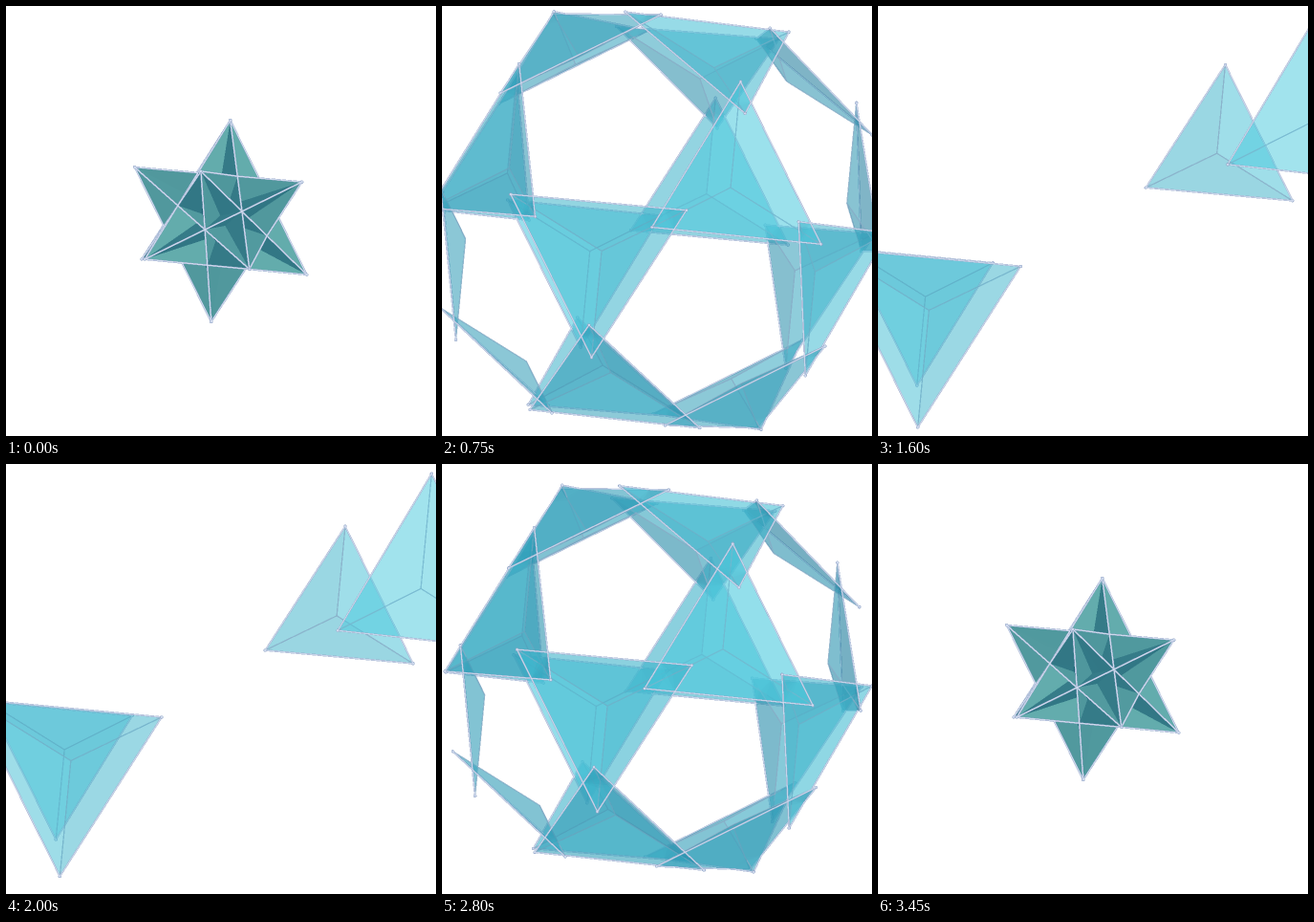
An HTML page with a canvas for the animation above (3500 ms loop, 450 by 450 pixels).

```html
<!DOCTYPE html>
<html lang="en">
<head>
<meta charset="utf-8">
<title>Exploding great icosahedron</title>
<style>
  html, body { margin: 0; width: 100%; height: 100%; overflow: hidden; background: #fff; }
  canvas { display: block; width: 450px; height: 450px; }
</style>
</head>
<body>
<canvas id="stage" width="450" height="450"></canvas>
<script>
const SIZE = 450, SS = 2, WIDE = SIZE * SS, CAP = 64;
const STEP = 50, STEPS = 70;
const UNIT = 55.8, EYE = 67, CX = 224.75, CY = 225;
const TILT_X = 0.05, TILT_Y = -0.009;
const PHI = (1 + Math.sqrt(5)) / 2;
const LIGHT = [0.35, -0.2, 0.915];
const RIM = [150, 168, 200], CORE = [208, 218, 238], INNER = [135, 172, 198];

const ctx = document.getElementById('stage').getContext('2d');

const clamp = (x, a, b) => Math.max(a, Math.min(b, x));
const mix = (a, b, t) => a.map((v, i) => v + (b[i] - v) * t);
const dot = (a, b) => a[0] * b[0] + a[1] * b[1] + a[2] * b[2];
const sub = (a, b) => a.map((v, i) => v - b[i]);
const cross = (a, b) => [
  a[1] * b[2] - a[2] * b[1],
  a[2] * b[0] - a[0] * b[2],
  a[0] * b[1] - a[1] * b[0]
];
const smooth = x => { x = clamp(x, 0, 1); return x * x * (3 - 2 * x); };

// The rotations of (0, ±a, ±b) through the three axes.
function cyclic(a, b) {
  const out = [];
  for (const s of [1, -1]) for (const t of [1, -1]) {
    out.push([0, s * a, t * b], [t * b, 0, s * a], [s * a, t * b, 0]);
  }
  return out;
}

const corners = cyclic(1, PHI);
const normals = cyclic(PHI, 1 / PHI);
for (const x of [1, -1]) for (const y of [1, -1]) for (const z of [1, -1]) normals.push([x, y, z]);

// One flat tetrahedron per face: a large triangle with its apex at the centre.
const pieces = normals.map(n => ({
  n: n.map(v => v / Math.sqrt(3)),
  base: corners.filter(c => Math.abs(dot(c, n) - 1 / PHI) < 0.01)
}));

function view([x, y, z]) {
  const sx = 0.897 * x + 0.444 * y, sy = -0.441 * x + 0.896 * y;
  return [sx + TILT_X * z, sy + TILT_Y * z, z - TILT_X * sx - TILT_Y * sy];
}

// Screen point; the third value grows toward the eye and is linear on screen.
function project([x, y, z]) {
  const k = 1 / (1 - z / EYE);
  return [SS * (CX + UNIT * x * k), SS * (CY + UNIT * y * k), k];
}

function makePoly(pts, color, alpha, bias = 0) {
  const [p, q, r] = pts;
  const ax = q[0] - p[0], ay = q[1] - p[1], ak = q[2] - p[2];
  const bx = r[0] - p[0], by = r[1] - p[1], bk = r[2] - p[2];
  const det = ax * by - ay * bx;
  if (Math.abs(det) < 1e-6) return null;
  const gx = (ak * by - bk * ay) / det, gy = (ax * bk - bx * ak) / det;
  const ys = pts.map(v => v[1]), ks = pts.map(v => v[2]);
  return {
    pts, color, alpha, gx, gy, bias,
    k0: p[2] - gx * p[0] - gy * p[1],
    top: Math.min(...ys), bottom: Math.max(...ys),
    near: Math.max(...ks), far: Math.min(...ks)
  };
}

function bar(a, b, width, color, alpha, bias) {
  const dx = b[0] - a[0], dy = b[1] - a[1], len = Math.hypot(dx, dy);
  if (len < 0.01) return null;
  const h = width * SS / 2, nx = -dy / len * h, ny = dx / len * h;
  return makePoly([
    [a[0] + nx, a[1] + ny, a[2]], [b[0] + nx, b[1] + ny, b[2]],
    [b[0] - nx, b[1] - ny, b[2]], [a[0] - nx, a[1] - ny, a[2]]
  ], color, alpha, bias);
}

function disc(c, radius, color, bias) {
  const pts = [];
  for (let i = 0; i < 8; i++) {
    const a = (i + 0.5) * Math.PI / 4;
    pts.push([c[0] + radius * SS * Math.cos(a), c[1] + radius * SS * Math.sin(a), c[2]]);
  }
  return makePoly(pts, color, 1, bias);
}

function buildScene(step) {
  const spread = 0.359 * Math.max(0, step - 5);
  const tint = smooth(step / 14);
  const alpha = 1 - 0.7 * smooth(step / 17);
  const dark = mix([10, 76, 101], [15, 108, 142], tint);
  const light = mix([99, 172, 172], [73, 202, 222], tint);
  const list = [];

  for (const { n, base } of pieces) {
    const move = n.map(v => v * spread);
    const body = [...base.map(c => c.map((v, i) => v + move[i])), move].map(view);
    const flat = body.map(project);

    for (const face of [[0, 1, 2], [0, 1, 3], [1, 2, 3], [2, 0, 3]]) {
      const [a, b, c] = face.map(i => body[i]);
      const m = cross(sub(b, a), sub(c, a));
      const lit = dot(m, LIGHT) / Math.hypot(...m) * (m[2] < 0 ? -1 : 1);
      const color = mix(dark, light, clamp(0.2 + 0.8 * lit, 0, 1));
      list.push(makePoly(face.map(i => flat[i]), color, alpha));
    }
    for (let i = 0; i < 3; i++) {
      const a = flat[i], b = flat[(i + 1) % 3];
      list.push(bar(a, b, 1.8, RIM, 0.85, 0.0004));
      list.push(bar(a, b, 1.1, CORE, 0.85, 0.0006));
      list.push(bar(a, flat[3], 1.3, INNER, 0.8, 0.0004));
      list.push(disc(a, 1.8, RIM, 0.0005));
      list.push(disc(a, 1.2, CORE, 0.0007));
    }
  }
  return list.filter(p => p && p.bottom > 0 && p.top < WIDE);
}

const count = new Uint8Array(WIDE);
const depth = new Float32Array(WIDE * CAP);
const layer = new Uint16Array(WIDE * CAP);
const sums = new Float32Array(SIZE * 3);

// Adds one polygon's span on a sample row, keeping each sample sorted near to far.
function addSpan(poly, id, y) {
  let x0 = Infinity, x1 = -Infinity;
  const pts = poly.pts;
  for (let i = 0, j = pts.length - 1; i < pts.length; j = i++) {
    const a = pts[i], b = pts[j];
    if ((a[1] <= y) === (b[1] <= y)) continue;
    const x = a[0] + (y - a[1]) / (b[1] - a[1]) * (b[0] - a[0]);
    if (x < x0) x0 = x;
    if (x > x1) x1 = x;
  }
  const from = Math.max(0, Math.ceil(x0 - 0.5));
  const to = Math.min(WIDE - 1, Math.ceil(x1 - 0.5) - 1);
  for (let x = from; x <= to; x++) {
    let k = poly.k0 + poly.gx * (x + 0.5) + poly.gy * y;
    if (k > poly.near) k = poly.near;
    if (k < poly.far) k = poly.far;
    k += poly.bias;
    const start = x * CAP;
    let at = start + count[x];
    if (count[x] < CAP) count[x]++;
    else if (depth[--at] >= k) continue;
    while (at > start && depth[at - 1] < k) {
      depth[at] = depth[at - 1];
      layer[at] = layer[at - 1];
      at--;
    }
    depth[at] = k;
    layer[at] = id;
  }
}

function blendRow(list) {
  for (let x = 0; x < WIDE; x++) {
    let r = 0, g = 0, b = 0, clear = 1;
    const start = x * CAP, end = start + count[x];
    for (let i = start; i < end && clear > 0.004; i++) {
      const { color, alpha } = list[layer[i]];
      const w = clear * alpha;
      r += w * color[0];
      g += w * color[1];
      b += w * color[2];
      clear -= w;
    }
    const o = (x / SS | 0) * 3, rest = clear * 255;
    sums[o] += r + rest;
    sums[o + 1] += g + rest;
    sums[o + 2] += b + rest;
  }
}

function render(step) {
  const list = buildScene(step);
  const image = ctx.createImageData(SIZE, SIZE);
  const data = image.data;
  for (let row = 0; row < SIZE; row++) {
    sums.fill(0);
    for (let s = 0; s < SS; s++) {
      const y = row * SS + s + 0.5;
      count.fill(0);
      for (let i = 0; i < list.length; i++) {
        if (list[i].top <= y && list[i].bottom > y) addSpan(list[i], i, y);
      }
      blendRow(list);
    }
    for (let x = 0; x < SIZE; x++) {
      const o = (row * SIZE + x) * 4;
      for (let c = 0; c < 3; c++) data[o + c] = sums[x * 3 + c] / (SS * SS);
      data[o + 3] = 255;
    }
  }
  return image;
}

// The way back mirrors the way out, so half of the steps serve the whole loop.
const cache = [];
let shown = -1;

function draw(ms) {
  const i = Math.floor(ms / STEP) % STEPS;
  const step = Math.min(i, STEPS - i);
  if (step === shown) return;
  cache[step] = cache[step] || render(step);
  ctx.putImageData(cache[step], 0, 0);
  shown = step;
}

const begin = performance.now();
function tick() {
  draw(performance.now() - begin);
  requestAnimationFrame(tick);
}
tick();
</script>
</body>
</html>
```
